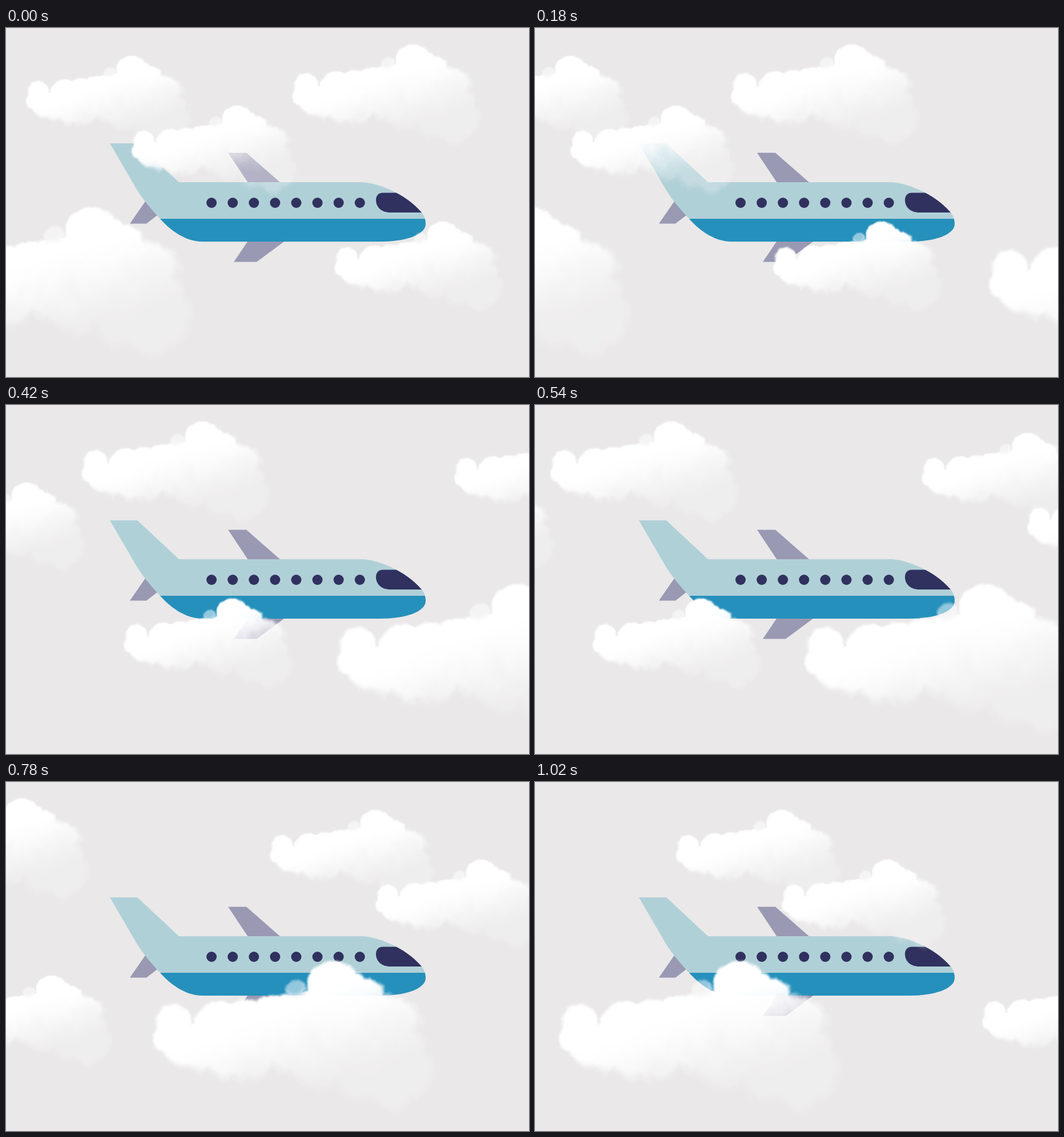
Write an HTML page with a canvas that moves like this. It is 916 px wide and 611 px high and loops after 1050 ms.

```html
<!DOCTYPE html>
<html lang="en">
<head>
<meta charset="utf-8">
<title>Plane in the clouds</title>
<style>
  html, body { margin: 0; width: 100%; height: 100%; overflow: hidden; background: #eae8e9; }
  canvas { display: block; }
</style>
</head>
<body>
<canvas id="stage" width="916" height="611"></canvas>
<script>
const ctx = document.getElementById('stage').getContext('2d');
const STEP = 30, STEPS = 35, PAD = 24;
const PEAK = { x: 323, y: 2 };

// Puffs of the cloud: x, y, radius
const puffs = [
  [42, 110, 31], [30, 136, 25], [60, 150, 38], [95, 152, 44], [125, 115, 46],
  [170, 120, 55], [215, 125, 62], [265, 110, 58], [256, 48, 17], [323, 46, 45],
  [355, 75, 52], [378, 65, 36], [438, 104, 36], [380, 130, 80], [425, 165, 60],
  [440, 190, 53], [415, 213, 45], [380, 198, 50], [300, 150, 70], [240, 150, 45],
  [190, 160, 42], [135, 170, 41]
];

// Peak x at the first step, peak x of the following copy at the last step, top y, scale
const clouds = [
  { x: 220, next: 432, y: 49, size: 0.585 },
  { x: 713, next: null, y: 29, size: 0.67 },
  { x: 405, next: 617, y: 136, size: 0.585 },
  { x: 765, next: 973, y: 339, size: 0.6 },
  { x: 150, next: 358, y: 314, size: 1 }
];

const mix = (a, b, t) => a + (b - a) * t;

function smooth(a, b, v) {
  const t = Math.min(1, Math.max(0, (v - a) / (b - a)));
  return t * t * (3 - 2 * t);
}

function hash(x, y) {
  let h = Math.imul(x, 374761393) + Math.imul(y, 668265263);
  h = Math.imul(h ^ (h >>> 13), 1274126177);
  return ((h ^ (h >>> 16)) >>> 0) / 4294967296;
}

function noise(x, y) {
  const i = Math.floor(x), j = Math.floor(y);
  const u = smooth(0, 1, x - i), v = smooth(0, 1, y - j);
  return mix(mix(hash(i, j), hash(i + 1, j), u),
             mix(hash(i, j + 1), hash(i + 1, j + 1), u), v);
}

// Layered noise, roughly -1 to 1
function rough(x, y) {
  let sum = 0, gain = 0.5, f = 1 / 36;
  for (let k = 0; k < 5; k++, gain *= 0.6, f *= 2) {
    sum += gain * (2 * noise(x * f + k * 17, y * f + k * 31) - 1);
  }
  return sum;
}

function cloudAlpha(x, y) {
  let depth = -99;
  for (const [cx, cy, r] of puffs) depth = Math.max(depth, r - Math.hypot(x - cx, y - cy));
  if (depth < -34) return 0;
  const low = y + 0.3 * (x - 250);
  const fluff = smooth(50, 190, low);
  const n = rough(x, y);
  const soft = mix(4, 14, fluff);
  const edge = smooth(-soft, soft, depth + n * mix(7, 17, fluff));
  const wisp = 1 - 0.5 * smooth(30, 10, Math.hypot(x - 254, y - 42));
  const body = 1 - 0.75 * smooth(70, 250, low + n * 20);
  return edge * wisp * body;
}

function makeCloud() {
  const c = document.createElement('canvas');
  c.width = 520 + 2 * PAD;
  c.height = 264 + 2 * PAD;
  const g = c.getContext('2d');
  const img = g.createImageData(c.width, c.height);
  img.data.fill(255);
  for (let y = 0, p = 3; y < c.height; y++) {
    for (let x = 0; x < c.width; x++, p += 4) {
      img.data[p] = 255 * cloudAlpha(x - PAD, y - PAD);
    }
  }
  g.putImageData(img, 0, 0);
  return c;
}

const cloud = makeCloud();
const wings = new Path2D(
  'M389 218.500H421L481 271H424Z M423 374H487L439 409.500H399Z M217 342.500H246L270 324L245 302Z');
const hull = new Path2D(
  'M182 202H230L303 270H622C650 270 700 290 728 323C733 329 735 336 735 343' +
  'C735 362 700 374 655 374H345C312 374 285 351 270 334C255 318 240 301 228 281Z');
const cockpit = new Path2D('M740 288.500H660C652 288.500 648 294 648 301C648 314 658 323 673 323H740Z');

function fill(color, path) {
  ctx.fillStyle = color;
  ctx.fill(path);
}

function drawPlane() {
  fill('#9a99b3', wings);
  fill('#b0d0d7', hull);
  ctx.save();
  ctx.clip(hull);
  ctx.fillStyle = '#2590bb';
  ctx.fillRect(180, 334, 560, 42);
  fill('#30315f', cockpit);
  ctx.restore();
  for (let i = 0; i < 8; i++) {
    const port = new Path2D();
    port.arc(360 + 37.1 * i, 306, 9, 0, 7);
    fill('#30315f', port);
  }
}

function drawCloud(peakX, top, size) {
  ctx.drawImage(cloud, peakX - (PEAK.x + PAD) * size, top - (PEAK.y + PAD) * size,
    cloud.width * size, cloud.height * size);
}

function draw(now) {
  const n = Math.floor((now % (STEP * STEPS)) / STEP);
  ctx.fillStyle = '#eae8e9';
  ctx.fillRect(0, 0, 916, 611);
  drawPlane();
  for (const { x, next, y, size } of clouds) {
    drawCloud(x - 26.35 * n, y, size);
    if (next !== null) drawCloud(next + 26.9 * (STEPS - 1 - n), y, size);
  }
}

let start;
function tick(now) {
  start ??= now;
  draw(now - start);
  requestAnimationFrame(tick);
}
draw(0);
requestAnimationFrame(tick);
</script>
</body>
</html>
```
